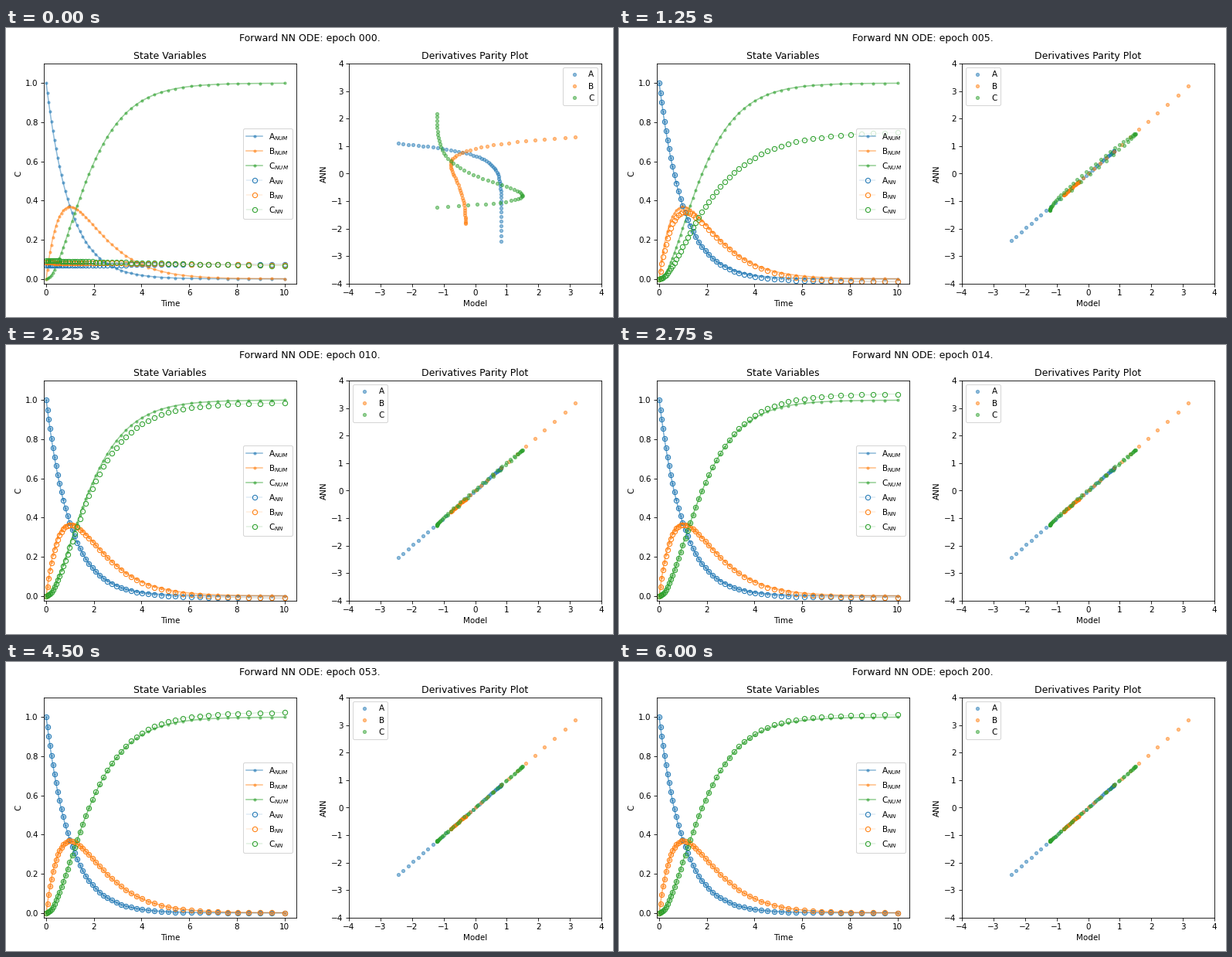
These frames come from a looping animation (786x374 px, 6.25 s). A matplotlib script:

```python
import numpy as np
import matplotlib.pyplot as plt
from matplotlib.animation import FuncAnimation

W, H, DPI = 786, 374, 75
FRAMES = 25
COLORS = dict(A="#1f77b4", B="#ff7f0e", C="#2ca02c")

# Reaction A -> B -> C with unit rates, sampled on a log-spaced time grid
t = np.logspace(0, np.log10(11), 50) - 1
s = np.log1p(t)
decay = np.exp(-t)
exact = np.array([decay, t * decay, 1 - (1 + t) * decay])
drift = t**3 / (t**3 + 100)


def zscore(rows):
    rows = np.asarray(rows)
    mean = rows.mean(axis=1, keepdims=True)
    return (rows - mean) / rows.std(axis=1, keepdims=True)


model = zscore([-decay, (1 - t) * decay, t * decay])


def fitted(gain, rise, tail=0, dip=0):
    """Concentrations of a nearly trained network."""
    a, b, c = exact
    return np.array([a - tail * drift,
                     b - tail * drift - dip * t * np.exp(-2 * t),
                     c * (gain + rise * drift)])


def parity(k):
    """Model derivatives with C bent into a thin loop of size k."""
    loop = 0.12 * np.cos(3 * (s - 1.42))
    return zscore(model + k * np.array([0 * t, -0.07 * np.exp(-2 * t), loop]))


# Key poses by step; steps between them are blended
states = {
    0: np.array([0.07 + 0.0005 * t, 0.084 - 0.0014 * t, 0.093 - 0.0027 * t]),
    2: np.array([-0.095 + 0.985 * np.exp(-0.68 * t),
                 0.204 * np.sin(np.pi * (s / s[-1])**0.9),
                 0.16 - 0.17 * np.exp(-1.1 * t) - 0.002 * t]),
    5: fitted(0.63, 0.13, tail=0.016, dip=0.2),
    7: fitted(0.9, 0.045, tail=0.012, dip=0.06),
    11: fitted(1, 0.034, tail=0.01, dip=0.03),
    18: fitted(1, 0.026),
    24: fitted(1, 0.014),
}
slopes = {
    0: zscore([-t - 0.01 * t**2, 0.043 * t**2 - t, t - 0.021 * t**2]),
    2: zscore([-np.exp(-0.8 * t) - 0.01 * t,
               (1 - t / 2) * np.exp(-t / 2) + 0.004 * t,
               np.cos(2.15 * (s - 1.1))]),
    5: parity(1),
    7: parity(0.5),
    11: parity(0.35),
    18: parity(0.08),
    24: model,
}


def blend(keys, i):
    lo = max(k for k in keys if k <= i)
    hi = min(k for k in keys if k >= i)
    f = (i - lo) / max(hi - lo, 1)
    return (1 - f) * keys[lo] + f * keys[hi]


def epoch(i):
    """Single epochs first, then exponentially growing strides."""
    return i if i < 8 else round(4.5 + 9.45 * np.exp(0.2329 * (i - 11)))


def add_axes(x, title, xlabel, ylabel):
    ax = fig.add_axes([x / W, 43 / H, 327 / W, 285 / H])
    ax.set(title=title, xlabel=xlabel, ylabel=ylabel)
    return ax


# The small margin keeps the pixel size from being rounded down
fig = plt.figure(figsize=((W + 0.01) / DPI, (H + 0.01) / DPI), dpi=DPI,
                 facecolor="white")
heading = fig.text(0.5, 1 - 7.2 / H, "", ha="center", va="top", fontsize=12)

left = add_axes(49, "State Variables", "Time", "C")
left.set(xlim=(-0.1, 10.5), ylim=(-0.025, 1.1),
         xticks=range(0, 11, 2), yticks=np.arange(6) / 5)
for (name, color), y in zip(COLORS.items(), exact):
    left.plot(t, y, ".-", color=color, alpha=0.5, label=f"{name}$_{{NUM}}$")
rings = [left.plot([], [], "o-", color=color, lw=0.2, mfc="none",
                   label=f"{name}$_{{NN}}$")[0]
         for name, color in COLORS.items()]
left.legend(loc="center right")

right = add_axes(444, "Derivatives Parity Plot", "Model", "ANN")
right.set(xlim=(-4, 4), ylim=(-4, 4),
          xticks=range(-4, 5), yticks=range(-4, 5))
dots = [right.plot([], [], "o", color=color, ms=4, alpha=0.5, label=name)[0]
        for name, color in COLORS.items()]
legend = right.legend(loc="upper right")


def update(i):
    heading.set_text(f"Forward NN ODE: epoch {epoch(i):03d}.")
    for ring, y in zip(rings, blend(states, i)):
        ring.set_data(t, y)
    for dot, x, y in zip(dots, model, blend(slopes, i)):
        dot.set_data(x, y)
    legend.set_loc("upper right" if i < 3 else "upper left")
    return [heading, legend, *rings, *dots]


anim = FuncAnimation(fig, update, frames=FRAMES, interval=250,
                     repeat=True, repeat_delay=0, blit=False)
plt.show()
```
